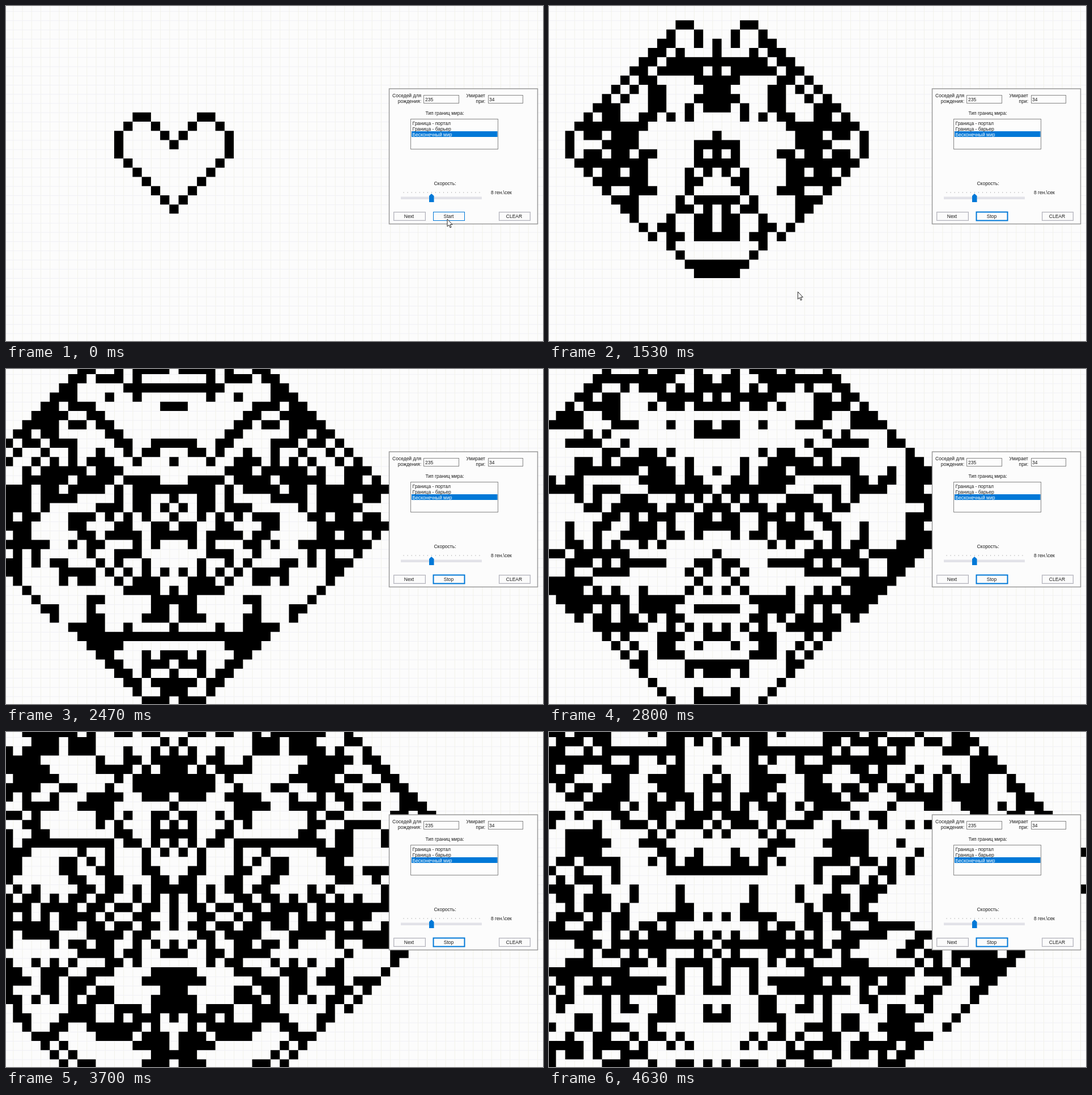
These frames come from a looping animation (948 px wide and 591 px high, 4.66 s). An HTML page with a canvas:

```html
<!DOCTYPE html>
<html lang="ru">
<head>
<meta charset="utf-8">
<title>Cellular automaton</title>
<style>
  html, body { margin: 0; width: 100%; height: 100%; overflow: hidden; background: #fcfcfc; }
  canvas, svg { position: absolute; left: 0; top: 0; display: block; }
  text { font: 8.5px "Liberation Sans", Arial, sans-serif; fill: #1c1c1c; }
  .mid { text-anchor: middle; }
  .end { text-anchor: end; }
  .field { fill: #fdfdfd; stroke: #858585; }
  .button { fill: #fbfbfb; stroke: #b2b2ba; }
  .inner { fill: none; stroke: #e6e6ea; }
  .accent { fill: #0078d7; }
</style>
</head>
<body>
<canvas id="world" width="948" height="591"></canvas>
<svg width="948" height="591" viewBox="0 0 948 591">
  <rect x="676.5" y="146" width="262" height="238.5" fill="#fcfcfc" stroke="#999" stroke-width="1.5"/>

  <text class="end" x="733" y="161">Соседей для</text>
  <text class="end" x="733" y="171">рождения:</text>
  <rect class="field" x="737.5" y="157.5" width="62" height="14"/>
  <text x="740" y="167.5">235</text>
  <text class="end" x="846" y="161">Умирает</text>
  <text class="end" x="846" y="171">при:</text>
  <rect class="field" x="851.5" y="157.5" width="61" height="14"/>
  <text x="853" y="167.5">34</text>

  <text class="mid" x="774.5" y="192">Тип границ мира:</text>
  <rect class="field" x="714.5" y="199.5" width="154" height="53"/>
  <rect class="accent" x="716" y="221" width="151.5" height="10"/>
  <text x="717.5" y="209.5">Граница - портал</text>
  <text x="717.5" y="219.5">Граница - барьер</text>
  <text x="717.5" y="229.5" style="fill:#fff">Бесконечный мир</text>

  <text class="mid" x="775" y="316">Скорость:</text>
  <path d="M701.5 329H837" stroke="#bdbdbd" stroke-width="2" stroke-dasharray="1 6.05"/>
  <rect x="697" y="336.5" width="143" height="4.5" fill="#e2e2e8"/>
  <path class="accent" d="M751 331L755.5 335V346H747V335Z"/>
  <text x="856" y="331.5">8 ген.\сек</text>

  <rect class="button" x="684.5" y="363.5" width="56" height="15"/>
  <rect class="inner" x="685.5" y="364.5" width="54" height="13"/>
  <text class="mid" x="711.5" y="374">Next</text>
  <rect class="button" x="870.5" y="363.5" width="55" height="15"/>
  <rect class="inner" x="871.5" y="364.5" width="53" height="13"/>
  <text class="mid" x="897" y="374">CLEAR</text>
  <rect id="toggle" x="754.5" y="363.5" width="55" height="15" fill="#fbfbfb" stroke="#0078d7"/>
  <text id="label" class="mid" x="781.5" y="374">Start</text>

  <path id="cursor" d="M0 0V13L3 10.3L5 15L7 14.2L5 9.6H9Z" fill="#fff" stroke="#222" stroke-width="1"/>
</svg>
<script>
const LOOP = 4660, START = 208, TICK = 125, LAST = 35;
const SIZE = 96, MID = 48, PITCH = 16.24;
const BIRTH = [2, 3, 5], STAY = [3, 4];

// right half of the heart, mirrored about column 0
const heart = [[0, 0], [1, -1], [2, -2], [3, -3], [4, -3], [5, -2], [6, -1], [6, 0],
  [6, 1], [5, 2], [4, 3], [3, 4], [2, 5], [1, 6], [0, 7]];
// time, x, y
const path = [[0, 779, 376], [850, 779, 376], [1070, 752, 436], [1530, 439.5, 504],
  [1600, 425, 515], [1900, 395, 606]];

const $ = id => document.getElementById(id);
const ctx = $('world').getContext('2d');
const edgeX = col => 288.4 + PITCH * (col - MID);
const edgeY = row => 236.45 + PITCH * (row - MID);

function seed() {
  const world = new Uint8Array(SIZE * SIZE);
  for (const [x, y] of heart)
    for (const side of [-x, x]) world[(y + MID) * SIZE + side + MID] = 1;
  return world;
}

function step(world) {
  const next = new Uint8Array(SIZE * SIZE);
  for (let y = 1; y < SIZE - 1; y++) {
    for (let x = 1; x < SIZE - 1; x++) {
      const i = y * SIZE + x;
      let near = -world[i];
      for (let dy = -SIZE; dy <= SIZE; dy += SIZE)
        near += world[i + dy - 1] + world[i + dy] + world[i + dy + 1];
      next[i] = (world[i] ? STAY : BIRTH).includes(near) ? 1 : 0;
    }
  }
  return next;
}

const worlds = [seed()];
while (worlds.length <= LAST) worlds.push(step(worlds[worlds.length - 1]));

function drawWorld(world) {
  ctx.fillStyle = '#fcfcfc';
  ctx.fillRect(0, 0, 948, 591);
  for (let i = 0; i < SIZE; i++) {
    ctx.fillStyle = '#f2f2ea';
    ctx.fillRect(edgeX(i), 0, 1, 591);
    ctx.fillStyle = '#f0f0f5';
    ctx.fillRect(0, edgeY(i), 948, 1);
  }
  // one path, so that neighbouring cells join without seams
  ctx.beginPath();
  world.forEach((alive, i) => {
    const col = i % SIZE;
    if (alive) ctx.rect(edgeX(col), edgeY((i - col) / SIZE), PITCH, PITCH);
  });
  ctx.fillStyle = '#000';
  ctx.fill();
}

function cursorAt(t) {
  const k = path.findIndex(p => p[0] > t);
  if (k < 0) return path[path.length - 1].slice(1);
  const [t0, x0, y0] = path[k - 1], [t1, x1, y1] = path[k];
  const f = (t - t0) / (t1 - t0);
  return [x0 + (x1 - x0) * f, y0 + (y1 - y0) * f];
}

let shown = -1;
const begin = performance.now();

function render() {
  const t = (performance.now() - begin) % LOOP;
  const gen = Math.min(LAST, Math.max(0, Math.floor((t - START) / TICK)));
  if (gen !== shown) drawWorld(worlds[shown = gen]);

  const running = t >= START;
  $('label').textContent = running ? 'Stop' : 'Start';
  $('toggle').setAttribute('stroke-width', running ? 2 : 1);
  $('cursor').setAttribute('transform', `translate(${cursorAt(t)})`);
  requestAnimationFrame(render);
}
render();
</script>
</body>
</html>
```
